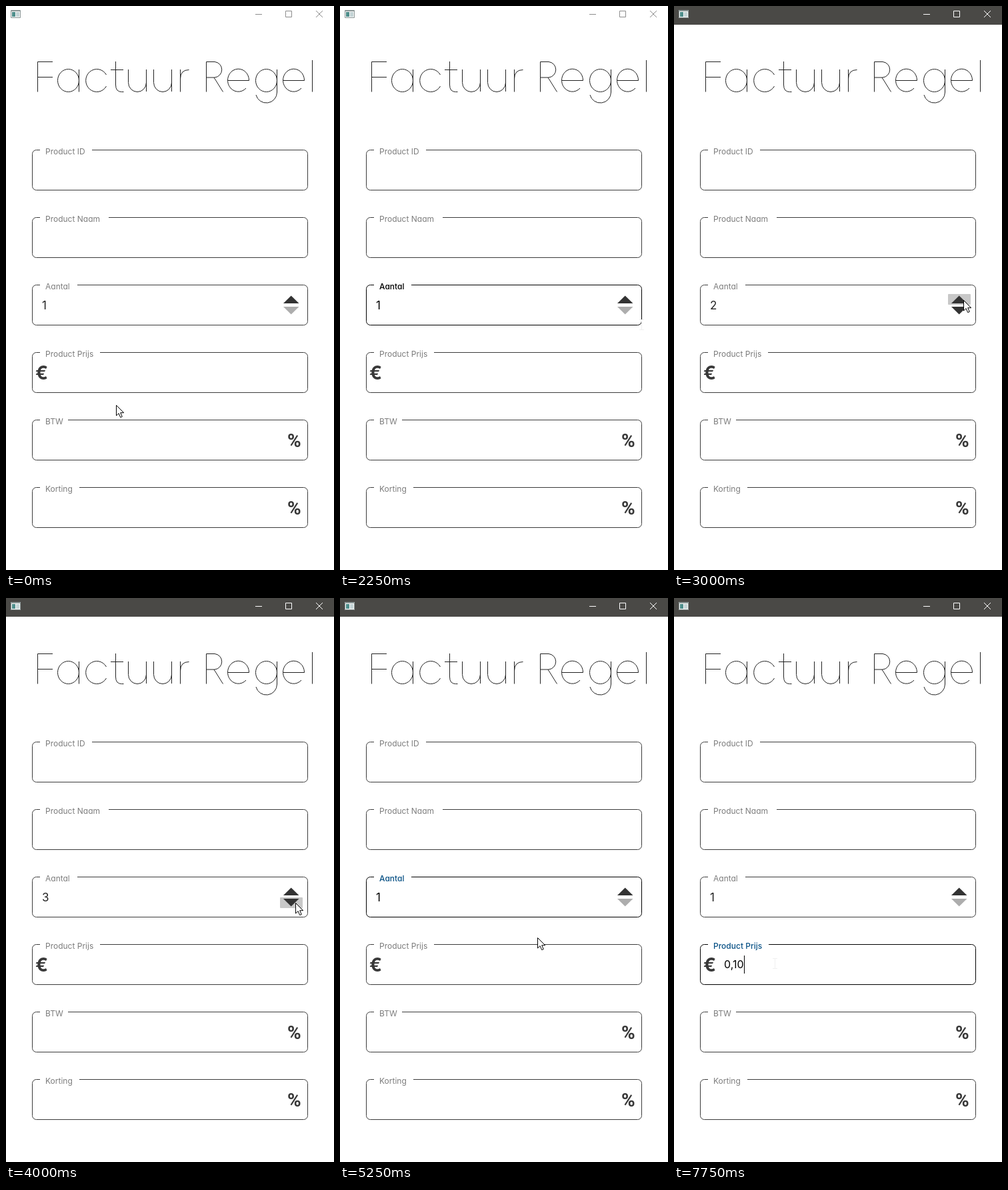
An HTML page with a canvas for the animation above (8 s loop, 492 by 844 pixels).

```html
<!DOCTYPE html>
<html lang="nl">
<head>
<meta charset="utf-8">
<title>Factuur Regel</title>
<style>
  html, body { margin: 0; width: 100%; height: 100%; overflow: hidden; background: #fff; }
  canvas { position: absolute; left: 0; top: 0; }
  span {
    position: absolute; white-space: pre; color: #222;
    font-family: Inter, "Open Sans", sans-serif; font-feature-settings: "cv11";
  }
  .label { left: 59px; font-size: 12px; line-height: 16px; color: #7c7c7c; }
  .label.hover { color: #000; font-weight: 500; }
  .label.focus { color: #0a5286; font-weight: 500; }
  .value { font-size: 17px; line-height: 27px; }
  .sign { font-size: 28px; line-height: 32px; font-weight: 700; color: #383838; }
  .percent { font-family: Roboto, sans-serif; font-weight: 600; }
  #price { height: 27px; color: #000; border-right: 1px solid transparent; font-size: 16px; }
  #price.caret { border-color: #000; }
</style>
</head>
<body>
<canvas id="base" width="492" height="844"><h1>Factuur Regel</h1></canvas>
<div id="text"></div>
<canvas id="top" width="492" height="844"></canvas>
<script>
const LOOP = 8000, TICK = 250;
const base = document.getElementById('base').getContext('2d');
const over = document.getElementById('top').getContext('2d');
const textLayer = document.getElementById('text');

const fields = [
  ['Product ID', 129], ['Product Naam', 154], ['Aantal', 107],
  ['Product Prijs', 141], ['BTW', 93], ['Korting', 110]
].map(([name, gapEnd], i) => ({ name, gapEnd, y: 215 + 101 * i }));
const AMOUNT = 2, PRICE = 3;

// Pointer stops: tick, x, y
const stops = [
  [0, 165, 597], [5, 440, 480], [6, 440, 480], [7, 462, 480], [8, 467, 479],
  [9, 452, 477], [10, 440, 466], [11, 434, 440], [14, 434, 440],
  [16, 434, 456], [18, 434, 456], [19, 440, 468], [23, 151, 547], [32, 151, 547]
];

function addText(text, className, x, y) {
  const el = document.createElement('span');
  el.textContent = text;
  el.className = className;
  el.style.left = x + 'px';
  el.style.top = y + 'px';
  textLayer.append(el);
  return el;
}

for (const f of fields) f.label = addText(f.name, 'label', 59, f.y - 5);
const amountText = addText('1', 'value', 54, 435);
const priceText = addText('', 'value', 75, 535);
priceText.id = 'price';
addText('€', 'sign', 44, 533);
addText('%', 'sign percent', 422, 635);
addText('%', 'sign percent', 422, 736);

function stroke(ctx, color, path) {
  ctx.strokeStyle = color;
  ctx.lineWidth = 1;
  ctx.stroke(new Path2D(path));
}

function polygon(ctx, color, points) {
  ctx.fillStyle = color;
  ctx.beginPath();
  points.forEach(([x, y]) => ctx.lineTo(x, y));
  ctx.closePath();
  ctx.fill();
}

// Hairline letters of the heading
const letterU = x => `M${x} 95V114.5a13.5 14 0 0 0 27 0V95m0 0V128`;
const letterE = x => `M${x} 111.5H${x + 32}a16 17 0 1 0 -4.5 11.5`;
const heading = [
  'M70 83.5H47.5V128.5M47.5 106.5H70',
  'M109.5 95V128.5M109.5 111.5a16 17 0 1 0 -32 0a16 17 0 1 0 32 0',
  'M150.5 103a16.5 17 0 1 0 0 17',
  'M164.5 83V118q0 10.5 9 10.5h3M157 95.5H176',
  letterU(183.5), letterU(221.5),
  'M261.5 95V128.5M261.5 109q0-13.5 13-13.5',
  'M300.5 128.5V83.5H313a11.8 11.8 0 0 1 0 23.5H300.5M312 107L325.5 128.5',
  letterE(332.5),
  'M406.5 95V129a16 16 0 0 1 -31.5 4M406.5 111.5a16 17 0 1 0 -32 0a16 17 0 1 0 32 0',
  letterE(415.5),
  'M459.5 81V128.5'
].join('');

function drawTitleBar(active) {
  if (active) {
    base.fillStyle = '#4a4946';
    base.fillRect(0, 0, 492, 28);
  }
  const ink = active ? '#fff' : '#8c8c8c';
  stroke(base, ink, 'M374 12.5H384M419.5 7.5h9v9h-9zM465 7l10 10M475 7l-10 10');
  base.fillStyle = '#f6f6f6';
  base.fillRect(7, 6, 15, 12);
  base.fillStyle = '#4f8f8c';
  base.fillRect(9, 9, 5, 7);
  base.fillStyle = '#c4d4d6';
  base.fillRect(15, 9, 5, 7);
  stroke(base, '#8a9696', 'M7.5 6.5h14v11h-14zM7.5 7.5h14');
}

function drawField({ y, gapEnd }, strong) {
  const t = y + 0.5, gap = gapEnd + (strong && y === fields[PRICE].y ? 1 : 0);
  stroke(base, strong ? '#000' : '#3c3c3c',
    `M${gap} ${t}H446.5a6 6 0 0 1 6 6v48a6 6 0 0 1 -6 6H45.5a6 6 0 0 1 -6 -6v-48a6 6 0 0 1 6 -6H51`);
}

function drawSpinner(button, amount) {
  if (button === 'up' || (button === 'down' && amount > 1)) {
    base.fillStyle = '#c8c8c8';
    base.beginPath();
    base.roundRect(411, button === 'up' ? 431 : 448, 34, 16, 1);
    base.fill();
  }
  polygon(base, '#333', [[416, 445], [439.5, 445], [427.7, 433.5]]);
  polygon(base, amount > 1 ? '#333' : '#adadad', [[416, 450], [439.5, 450], [427.7, 461.5]]);
}

function drawArrow(x, y) {
  const arrow = 'm0 0v15.5l3.6-3.4l2.6 6l2.6-1.1l-2.6-5.8h5z';
  const path = `M${x + 0.5} ${y + 0.5}${arrow}`;
  over.fillStyle = '#fff';
  over.fill(new Path2D(path));
  stroke(over, '#000', path);
}

function drawBeam(x, y) {
  stroke(over, '#f0f0f0', `M${x - 3} ${y - 7.5}h7m-3.5 0v15m-3.5 0h7`);
}

function pointerAt(tick) {
  const i = stops.findIndex(s => s[0] > tick);
  const [t0, x0, y0] = stops[i - 1], [t1, x1, y1] = stops[i];
  const k = (tick - t0) / (t1 - t0);
  return [Math.round(x0 + (x1 - x0) * k), Math.round(y0 + (y1 - y0) * k)];
}

function amountAt(tick) {
  if (tick < 12 || tick >= 18) return 1;
  return tick >= 14 && tick < 17 ? 3 : 2;
}

function buttonAt(x, y) {
  if (x < 411 || x > 445 || y < 431 || y > 463) return null;
  return y < 447 ? 'up' : 'down';
}

function render(tick) {
  const [x, y] = pointerAt(tick);
  const amount = amountAt(tick);
  const button = buttonAt(x, y);
  const focus = tick >= 23 ? PRICE : tick >= 19 ? AMOUNT : -1;
  const hover = button ? -1
    : fields.findIndex(f => x >= 39 && x <= 453 && y >= f.y && y <= f.y + 61);

  base.clearRect(0, 0, 492, 844);
  over.clearRect(0, 0, 492, 844);
  drawTitleBar(tick >= 12);
  stroke(base, '#222', heading);
  fields.forEach((f, i) => {
    drawField(f, i === hover || i === focus);
    f.label.className = 'label' + (i === focus ? ' focus' : i === hover ? ' hover' : '');
  });
  drawSpinner(button, amount);

  amountText.textContent = amount;
  amountText.style.color = hover === AMOUNT || focus === AMOUNT ? '#000' : '#222';
  priceText.textContent = tick < 29 ? '' : '0,10'.slice(0, [1, 3, 4][tick - 29]);
  const caret = focus === PRICE && (tick >= 27 || tick < 25);
  priceText.className = 'value' + (caret ? ' caret' : '');

  if (hover < 0) drawArrow(x, y);
  else drawBeam(x, y);
}

let start, shown = -1;
function frame(now) {
  start ??= now;
  const tick = Math.floor(((now - start) % LOOP) / TICK);
  if (tick !== shown) render(shown = tick);
  requestAnimationFrame(frame);
}
render(0);
requestAnimationFrame(frame);
</script>
</body>
</html>
```
